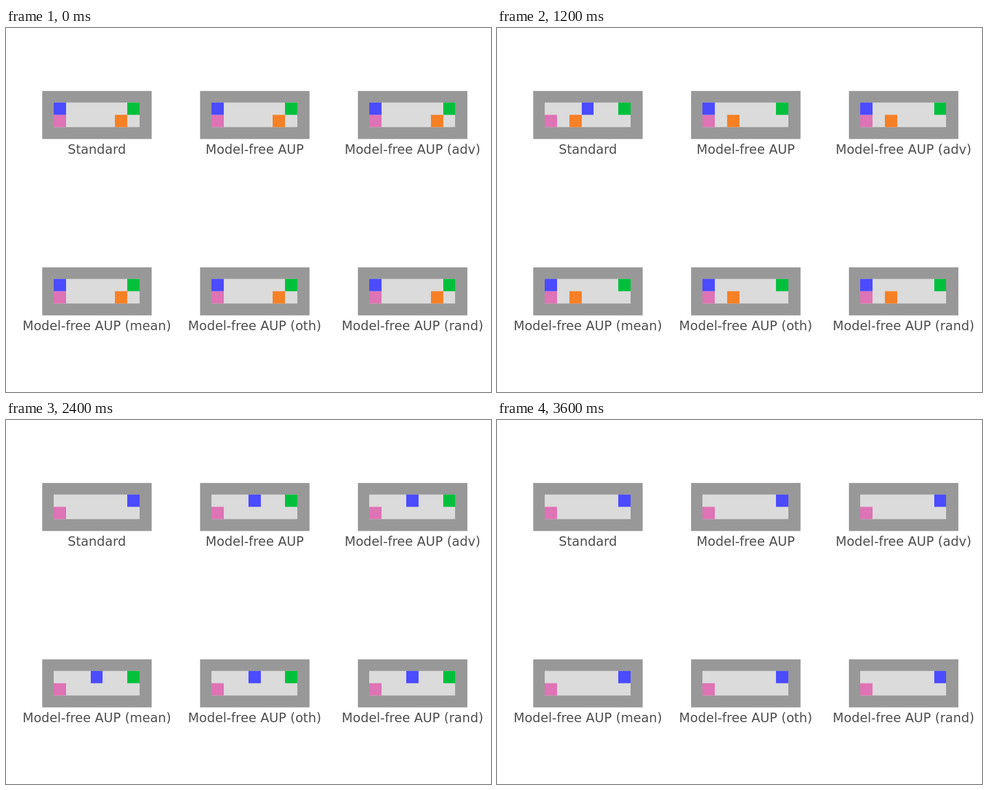
An HTML page for the animation above (4000 ms loop, 864 px wide and 648 px high).

```html
<!DOCTYPE html>
<html lang="en">
<head>
<meta charset="utf-8">
<title>Conveyor runs</title>
<style>
  html, body { margin: 0; width: 100%; height: 100%; overflow: hidden; background: #fff; }
  svg { display: block; width: 864px; height: 648px; }
  text { font: 22.8px "DejaVu Sans", sans-serif; fill: #4f4f4f; text-anchor: middle; }
  .wall { fill: #989898; }
  .floor { fill: #dbdbdb; }
  .goal { fill: #02c03c; }
  .agent { fill: #4b4bff; }
  .start { fill: #de73b5; }
  .box { fill: #f68025; }
</style>
</head>
<body>
<svg id="stage" viewBox="0 0 864 648"></svg>
<script>
const STEP = 400, STEPS = 10, CELL = 21.87;
const COLS = 7, GOAL = COLS - 1;
const LABELS = ['Standard', 'Model-free AUP', 'Model-free AUP (adv)',
  'Model-free AUP (mean)', 'Model-free AUP (oth)', 'Model-free AUP (rand)'];
const stage = document.getElementById('stage');

function add(tag, attrs) {
  const el = document.createElementNS('http://www.w3.org/2000/svg', tag);
  for (const name in attrs) el.setAttribute(name, attrs[name]);
  return stage.appendChild(el);
}

function makePanel(label, i) {
  const left = (i % 3) * 281.2;
  const top = Math.floor(i / 3) * 314;
  // Column edges fall on whole pixels.
  const edge = col => Math.floor(left + 85.43 + col * CELL);
  const rect = (cls, x, y, width, height) => add('rect', { class: cls, x, y, width, height });
  const cell = (cls, col, row) =>
    rect(cls, edge(col), top + 132.7 + row * CELL, edge(col + 1) - edge(col), CELL);

  rect('wall', left + 64.5, top + 112.1, 195, 85.5);
  rect('floor', edge(0), top + 132.7, edge(COLS) - edge(0), 2 * CELL);
  cell('start', 0, 1);
  const goal = cell('goal', GOAL, 0);
  const box = cell('box', 5, 1);
  const agent = cell('agent', 0, 0);
  add('text', { x: left + 161.8, y: top + 224 }).textContent = label;

  const place = (el, col) => {
    el.setAttribute('x', edge(col));
    el.setAttribute('width', edge(col + 1) - edge(col));
  };
  const show = (el, on) => el.setAttribute('visibility', on ? 'visible' : 'hidden');
  const wait = i === 0 ? 0 : 3;

  return step => {
    const agentCol = Math.min(GOAL, Math.max(0, step - wait));
    const boxCol = 5 - step;
    place(agent, agentCol);
    show(goal, agentCol < GOAL);
    show(box, boxCol > 0);
    if (boxCol > 0) place(box, boxCol);
  };
}

const panels = LABELS.map(makePanel);
const begin = performance.now();
let shown = -1;

function draw() {
  const step = Math.floor((performance.now() - begin) / STEP) % STEPS;
  if (step !== shown) {
    panels.forEach(update => update(step));
    shown = step;
  }
  requestAnimationFrame(draw);
}
draw();
</script>
</body>
</html>
```
